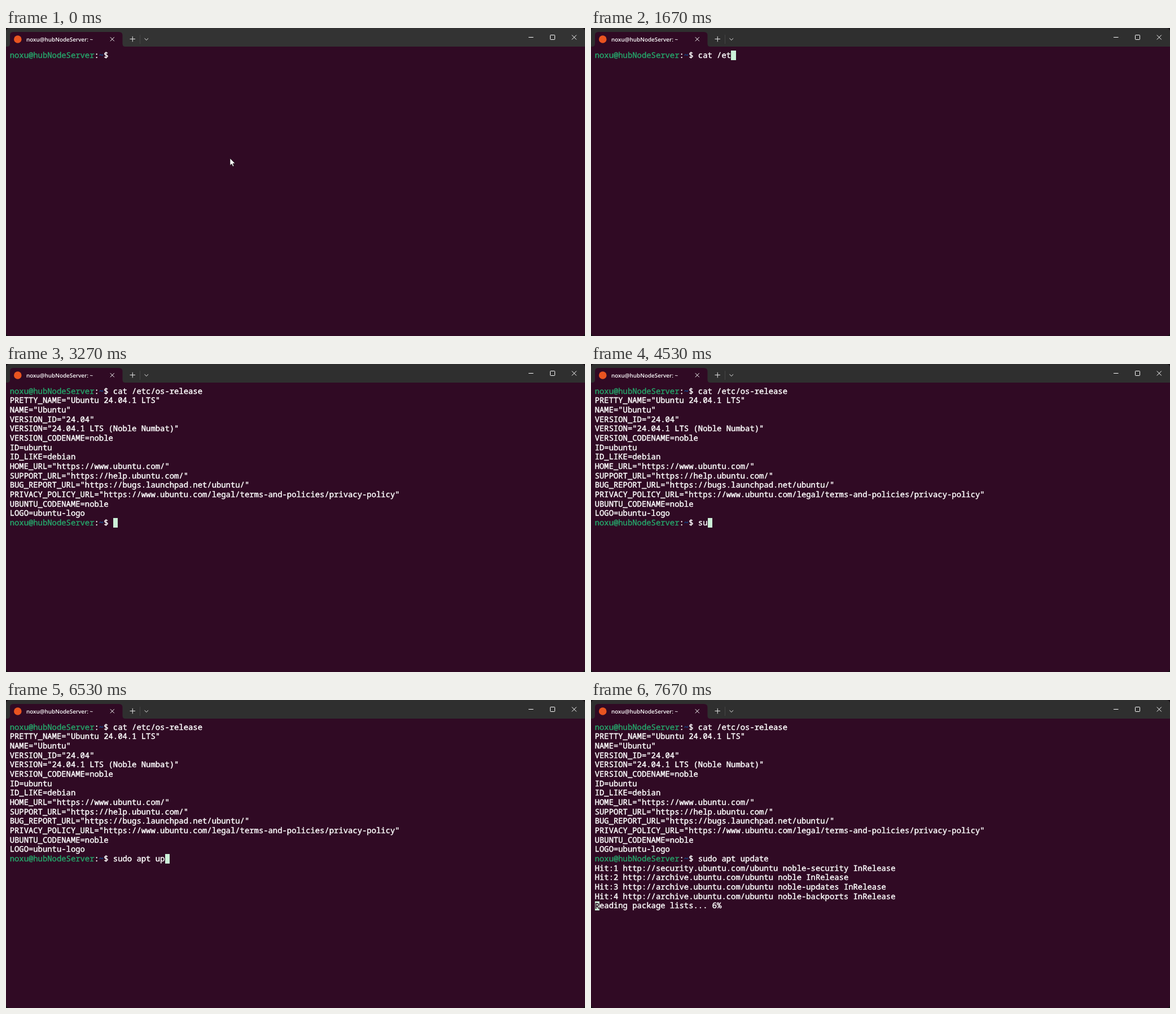
These frames come from a looping animation (1026x546 px, 8 s). An HTML page:

```html
<!DOCTYPE html>
<html lang="en">
<head>
<meta charset="utf-8">
<title>Terminal</title>
<style>
  html, body { margin: 0; width: 100%; height: 100%; overflow: hidden; background: #111; }
  #win { position: absolute; left: 0; top: 0; width: 1026px; height: 546px; overflow: hidden;
    background: #300a24; border-radius: 6px; text-rendering: geometricPrecision; }
  #bar { position: absolute; left: 0; top: 0; width: 1026px; height: 33px; }
  #bar svg { position: absolute; left: 0; top: 0; }
  #tab { position: absolute; left: 36px; top: 13px; color: #fff; white-space: pre;
    font: 600 9.85px/14px "Open Sans", sans-serif; }
  #term, #cur { margin: 0; position: absolute; white-space: pre; -webkit-text-stroke: .45px;
    font: 500 13.889px/16.6667px "Noto Sans Mono", monospace; font-variant-ligatures: none; }
  #term { left: 6.67px; top: 40.6px; color: #fff; }
  #cur { width: 8.333px; height: 16.667px; line-height: 17.8px; background: #ccf0d8; color: #300a24; }
  #mouse { position: absolute; left: 0; top: 0; }
  .user { color: #26a269; }
  .path { color: #12488b; }
  .wait { color: #a2734c; }
</style>
</head>
<body>
<div id="win">
  <div id="bar">
    <svg width="1026" height="33" fill="none" stroke="#fff" stroke-width="1">
      <path d="M2 33 Q7 33 7 28 V13 Q7 7 13 7 H200 Q206.500 7 206.500 13 V28 Q206.500 33 211 33 Z" fill="#300a24" stroke="none"/>
      <circle cx="20.800" cy="20" r="6.800" fill="#e95420" stroke="none"/>
      <path d="M184.800 16.300 l7 7 m0 -7 l-7 7"/>
      <path d="M219.500 19.500 h9.500 M224.250 14.800 v9.500" stroke="#e8e8e8"/>
      <path d="M237.500 12 v16" stroke="#454545"/>
      <path d="M245.500 18.300 l3.300 3.200 l3.300 -3.200" stroke="#e8e8e8"/>
      <path d="M926 16.500 h8.500"/>
      <rect x="964.500" y="12.500" width="8" height="8" rx="0.800"/>
      <path d="M1002.800 12.500 l8 8 m0 -8 l-8 8"/>
    </svg>
    <div id="tab"></div>
  </div>
  <pre id="term"></pre>
  <div id="cur"></div>
  <svg id="mouse" width="12" height="18">
    <path d="M.5 .5 V13 L3.400 10.400 L5.400 15 L7.400 14.100 L5.500 9.700 L9.300 9.400 Z" fill="#fff" stroke="#111" stroke-width=".7"/>
  </svg>
</div>
<script>
const LOOP = 8000, COL = 8.3333, ROW = 16.6667, LEFT = 6.67, TOP = 40;
const $ = id => document.getElementById(id);
const bar = $('bar'), term = $('term'), cur = $('cur'), mouse = $('mouse');

const user = 'noxu@hubNodeServer';
$('tab').textContent = user + ': ~';
const prompt = `<span class="user">${user}</span>:<span class="path">~</span>$ `;
const promptLen = user.length + 4;

const release = `PRETTY_NAME="Ubuntu 24.04.1 LTS"
NAME="Ubuntu"
VERSION_ID="24.04"
VERSION="24.04.1 LTS (Noble Numbat)"
VERSION_CODENAME=noble
ID=ubuntu
ID_LIKE=debian
HOME_URL="https://www.ubuntu.com/"
SUPPORT_URL="https://help.ubuntu.com/"
BUG_REPORT_URL="https://bugs.launchpad.net/ubuntu/"
PRIVACY_POLICY_URL="https://www.ubuntu.com/legal/terms-and-policies/privacy-policy"
UBUNTU_CODENAME=noble
LOGO=ubuntu-logo`.split('\n');

const hits = ['security noble-security', 'archive noble', 'archive noble-updates', 'archive noble-backports']
  .map((s, i) => {
    const [host, suite] = s.split(' ');
    return `Hit:${i + 1} http://${host}.ubuntu.com/ubuntu ${suite} InRelease`;
  });

// [time, keys]
const first = [[865, 'c'], [995, 'a'], [1195, 't'], [1265, ' '], [1465, '/'], [1565, 'e'], [1665, 't'],
  [1925, 'c/'], [2465, 'o'], [2595, 's'], [2795, '-release ']];
const second = [[4325, 's'], [4525, 'u'], [4925, 'd'], [5065, 'o'], [5325, ' '], [5595, 'a'], [5795, 'p'],
  [5925, 't'], [6065, ' '], [6265, 'u'], [6525, 'p'], [6595, 'd'], [6725, 'a'], [6865, 't'], [6995, 'e']];
// [time, finished hits, status line]
const working = '0% [Working]', waiting = '0% [Waiting for headers]', reading = 'Reading package lists... ';
const update = [[7065, 0, ''], [7125, 0, working], [7195, 1, waiting], [7325, 2, waiting],
  [7465, 3, waiting], [7525, 4, working], [7595, 4, reading + '0%'], [7665, 4, reading + '6%']];
const listed = 3265;
const cursorOff = [[0, 265], [795, 865], [3925, 4325]];
// [time, x, y]
const pointer = [[0, 396.5, 230.5], [65, 393, 225], [125, 390, 220]];
const pointerGone = 925;

const typed = (keys, t) => keys.filter(k => k[0] <= t).map(k => k[1]).join('');
const last = (steps, t) => steps.filter(s => s[0] <= t).pop();

function screen(t) {
  let cmd = typed(first, t);
  const lines = [prompt + cmd];
  let col = promptLen + cmd.length, under = '';
  if (t >= listed) {
    cmd = typed(second, t);
    lines.push(...release, prompt + cmd);
    col = promptLen + cmd.length;
  }
  const step = last(update, t);
  if (step) {
    const [, done, status] = step;
    const isRead = status.startsWith(reading);
    lines.push(...hits.slice(0, done), isRead ? status : `<span class="wait">${status}</span>`);
    col = isRead ? 0 : status.length;
    under = isRead ? status[0] : '';
  }
  return { html: lines.join('\n'), col, row: lines.length - 1, under };
}

let shown = '';
function draw() {
  const t = performance.now() % LOOP;
  const s = screen(t);
  if (s.html !== shown) term.innerHTML = shown = s.html;

  cur.textContent = s.under;
  cur.style.left = LEFT + s.col * COL + 'px';
  cur.style.top = TOP + s.row * ROW + 'px';
  cur.style.visibility = cursorOff.some(([a, b]) => t >= a && t < b) ? 'hidden' : 'visible';

  const [, x, y] = last(pointer, t);
  mouse.style.transform = `translate(${x}px, ${y}px)`;
  mouse.style.visibility = t < pointerGone ? 'visible' : 'hidden';

  const grey = 51 - 4 * Math.min(1, t / 1466);
  bar.style.background = `rgb(${grey}, ${grey}, ${grey})`;
  requestAnimationFrame(draw);
}
draw();
</script>
</body>
</html>
```
